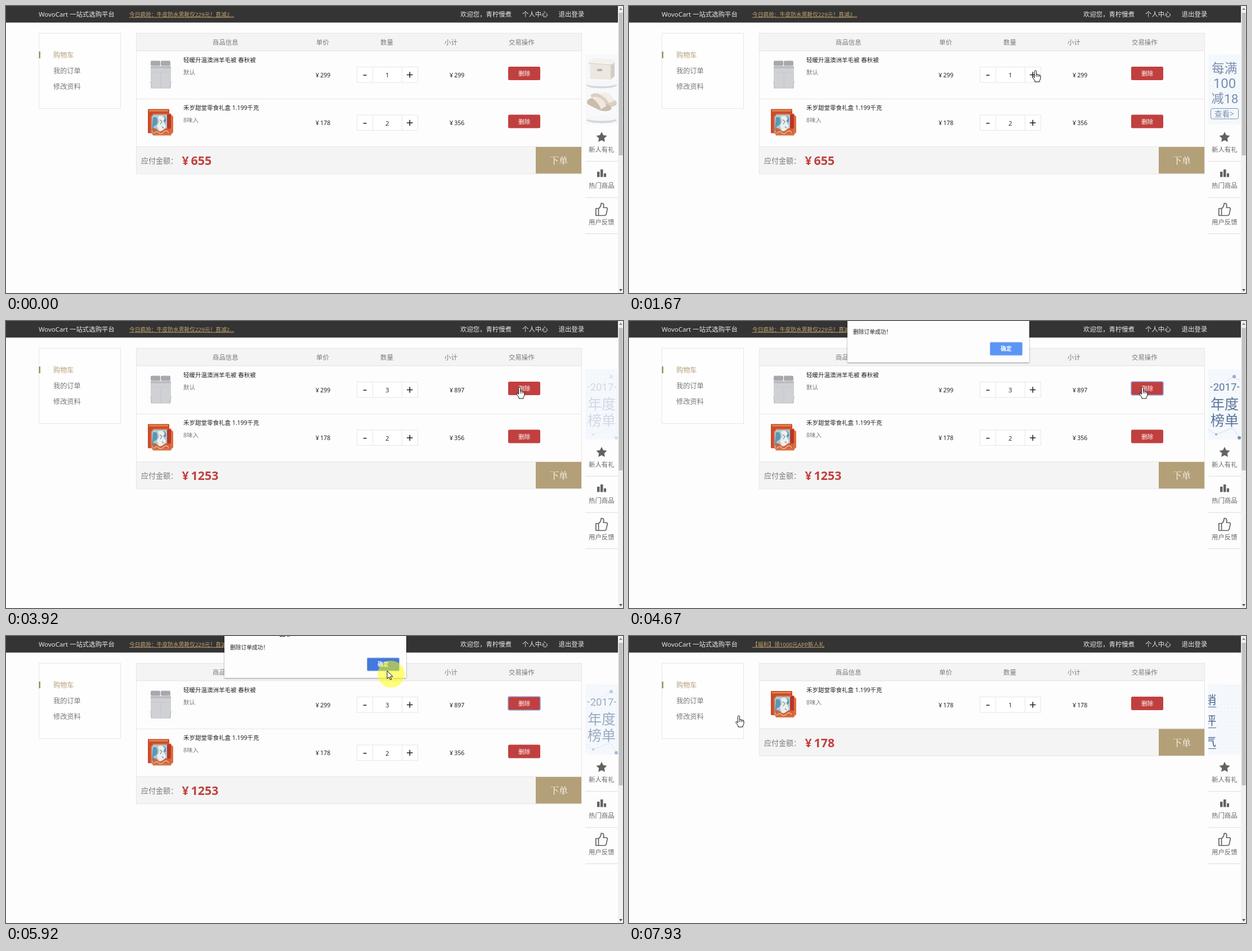
Recreate the animation shown at these times as an HTML page. Size 1096 by 511 pixels, loop 8 s.

```html
<!DOCTYPE html>
<html lang="zh-CN">
<head>
<meta charset="utf-8">
<title>购物车</title>
<style>
  html, body { margin: 0; width: 100%; height: 100%; overflow: hidden; background: #fdfdfd; }
  svg { display: block; width: 1096px; height: 511px; }
  text { font-family: "Noto Sans", "Noto Sans CJK SC", "Noto Sans CJK", sans-serif; white-space: pre; }
  .mid { text-anchor: middle; }
  .bold { font-weight: 700; }
  .link { text-decoration: underline; }
  .serif { font-family: "Noto Serif CJK SC", "Noto Serif", "Noto Sans CJK SC", serif; }
  .num { font-family: Roboto, sans-serif; }
</style>
</head>
<body>
<svg id="stage" viewBox="0 0 1096 511"></svg>
<script>
const LOOP = 8000, ROW = 85.5;
const LINE = '#e6e6e6', GOLD = '#b4a078', RED = '#c0403f', GREY = '#777a76', NAVY = '#46648f';

// Text is placed by the vertical centre of its characters.
const text = (x, mid, size, fill, s, cls = '', id = '') =>
  `<text x="${x}" y="${mid + size * 0.38}" font-size="${size}" fill="${fill}" class="${cls}" id="${id}">${s}</text>`;
const rect = (x, y, w, h, fill, more = '') =>
  `<rect x="${x}" y="${y}" width="${w}" height="${h}" fill="${fill}" ${more}/>`;
const path = (d, fill, more = '') => `<path d="${d}" fill="${fill}" ${more}/>`;
const group = (id, body, more = '') => `<g id="${id}" ${more}>${body}</g>`;
const dot = (x, y, r, fill) => `<circle cx="${x}" cy="${y}" r="${r}" fill="${fill}"/>`;
const disc = (x, y, rx, ry, fill) => `<ellipse cx="${x}" cy="${y}" rx="${rx}" ry="${ry}" fill="${fill}"/>`;
const price = (x, mid, size, fill, n, id, gap, cls = '') =>
  text(x, mid, size, fill, '¥', cls) + text(x + gap, mid, size, fill, n, cls, id);

const bedding =
  rect(257, 107, 36, 40, '#d0d1d4', 'rx="2"') +
  rect(257, 97.5, 17, 9, '#a6a8ac', 'rx="2"') + rect(275, 97.5, 17, 9, '#a6a8ac', 'rx="2"') +
  rect(257, 107, 36, 4, '#bcbdc1') +
  path('M257 118h36M275 118v29', 'none', 'stroke="#c2c3c7" stroke-width=".8"') +
  path('M256.5 134l3 13M293.5 134l-3 13', 'none', 'stroke="#b9babe"');

const giftBox =
  rect(252, 98, 38, 43, '#cd4a2c', 'rx="1"') +
  rect(254, 100, 34, 2, '#e29a50') +
  path('M261 106h32q1 4 4 5v29q-3 1-4 5h-32q-1-4-4-5v-29q3-1 4-5z', '#dc6f3c') +
  path('M262 108h24v16l5 6v12h-29l-3-4v-26z', '#a9cbd6') +
  path('M261 113q7-3 8 5t-5 10 5 11h-8l-2-4zM280 110q7 5 3 12l-5-4z', '#5b97b3') +
  path('M270 111q9-3 12 4l-3 5 5 8-3 9h-9l-4-9 4-7z', '#f0eee9') +
  path('M273 117l4 3-3 5M277 129l3 3', 'none', 'stroke="#6f8fa3" stroke-width="1.2"') +
  path('M260 133q5-3 9 2t9 1 6-4 8 1v9h-30z', '#d1613f') +
  path('M263 141q4-5 8-1t9-1 9 1', 'none', 'stroke="#f0c08a" stroke-width="1.4"') +
  rect(286, 107, 7, 26, '#bb3527', 'rx="2"');

const row = (key, y, picture, title, note, cost) => group('row' + key,
  picture +
  text(315, 96, 10.5, '#222', title) + text(315, 118, 10.5, GREY, note) +
  price(550, 123, 10.5, '#222', cost, '', 8.3) +
  rect(623.5, 108.5, 108, 27.5, '#fff', `stroke="${LINE}"`) +
  path('M651.5 108v28M703.5 108v28', 'none', `stroke="${LINE}"`) +
  path('M634.5 123.3h6M712 122.5h10.5M717.3 117.2v10.6', 'none', 'stroke="#222" stroke-width="1.6"') +
  text(677.3, 123, 11.4, '#333', '', 'mid', 'qty' + key) +
  price(788, 123, 10.5, '#222', '', 'sub' + key, 8.3) +
  rect(892, 108, 57, 24, RED, `rx="2.5" id="del${key}"`) +
  text(920.7, 120.3, 10.5, '#fff', '删除', 'mid'),
  `transform="translate(0 ${y})"`);

const header =
  rect(0, 0, 1087, 29.5, '#333433') +
  text(58, 15, 11.4, '#e8e8e8', 'WovoCart 一站式选购平台') +
  text(219, 15, 9.75, '#c6a472', '', 'link', 'news') +
  text(807, 15, 11.4, '#e8e8e8', '欢迎您，青柠慢煮') +
  text(917, 15, 11.4, '#e8e8e8', '个人中心') +
  text(981.5, 15, 11.4, '#e8e8e8', '退出登录');

const menu =
  rect(58.5, 48.5, 145, 134, '#fefefe', `stroke="${LINE}"`) +
  rect(58.5, 81, 2.5, 12, '#a08c68') +
  ['购物车', '我的订单', '修改资料'].map((s, i) =>
    text(84, 87 + i * 28.3, 12.2, i ? GREY : GOLD, s)).join('');

const table =
  rect(231.5, 48.5, 791, 32, '#f4f4f4') +
  [[367, '商品信息'], [551, '单价'], [665, '数量'], [779, '小计'], [893, '交易操作']]
    .map(([x, s]) => text(x, 64.5, 11.4, GREY, s)).join('') +
  path('M231 79.5H1022', 'none', `stroke="${LINE}"`) +
  row('A', 0, bedding, '轻暖升温澳洲羊毛被 春秋被', '默认', 299) +
  row('B', ROW, giftBox, '禾岁甜堂零食礼盒 1.199千克', '8味入', 178) +
  path('M231 165.5H1022', 'none', `stroke="${LINE}"`) +
  group('foot',
    rect(231.5, 251, 791, 48, '#f4f4f4') +
    path('M231 250.5H1022', 'none', `stroke="${LINE}"`) +
    text(240, 275.5, 13, GREY, '应付金额：') +
    price(312.5, 275, 21.4, RED, '', 'total', 16, 'bold') +
    rect(941, 251, 81, 47.5, GOLD) +
    text(966, 275, 16, '#fff', '下单', 'serif')) +
  `<rect id="frame" x="231.5" y="48.5" width="791" fill="none" stroke="${LINE}"/>`;

const star = Array.from({ length: 10 }, (_, i) => {
  const a = i * Math.PI / 5, r = i % 2 ? 5 : 10;
  return `${1058 + r * Math.sin(a)},${234 - r * Math.cos(a)}`;
}).join(' ');

const dock =
  `<polygon points="${star}" fill="#626262"/>` +
  rect(1050, 295, 4.5, 9.5, '#626262') + rect(1056, 291, 4.5, 13.5, '#626262') + rect(1062, 298, 4, 6.5, '#626262') +
  path('M1047.8 360.5h4.7v12.5h-4.7zM1052.5 361q5-4.5 4.5-9.5 5-1 4.8 4l-.6 3.5h5q2.6 0 2 2.6l-2 9q-.6 2.4-3 2.4h-10.7',
    'none', 'stroke="#626262" stroke-width="1.7" stroke-linejoin="round"') +
  ['新人有礼', '热门商品', '用户反馈'].map((s, i) =>
    text(1035, 255.3 + i * 64.5, 11.4, '#666', s) + rect(1029, 276 + i * 64.5, 58, 1, '#dedede')).join('');

const goods =
  rect(1029, 86, 58, 125, '#f8f9fb') + rect(1029, 86, 58, 125, 'url(#dots)') +
  disc(1058, 141, 27, 5.5, '#d3d7dd') + disc(1058, 138.5, 27, 4.5, '#f5f6f8') +
  path('M1037 102h37v29l-36-1z', '#ece8e1') + path('M1074 102l7-4v27l-7 6z', '#d3cdc4') +
  path('M1035 97l10-4 34 1 3 3v5l-8 4-39-3z', '#f5f2ed') +
  path('M1035 102l39 3 8-4', 'none', 'stroke="#c4bdb2" stroke-width=".8"') +
  rect(1050, 112, 9, 4, '#b9b0a3', 'rx="1"') +
  disc(1058, 203, 27, 5.5, '#d3d7dd') + disc(1058, 200, 27, 4.5, '#f5f6f8') +
  path('M1040 157q9-4 16 1l26 10q6 5 1 9-6 4-14 1l-28-15q-4-3-1-6z', '#d9cfc3') +
  path('M1053 156q9-5 17 0 9 5 10 13l-9 4q-5-10-18-17z', '#f3ede5') +
  path('M1033 168q5-6 13-3l28 13q4 5-2 8-9 3-19-1l-18-9q-5-4-2-8z', '#cabdae') +
  path('M1040 163q8-4 15 1 10 5 11 14l-9 6q-4-12-17-21z', '#f0e8de');

const sale =
  text(1035, 110.5, 22.7, NAVY, '每满') +
  text(1058, 136.5, 24, NAVY, '100', 'mid num') +
  text(1034.5, 164, 22, NAVY, '减') + text(1057, 164, 22.5, NAVY, '18', 'num') +
  rect(1033.5, 182.5, 49, 18.5, 'none', `rx="3" stroke="${NAVY}"`) +
  text(1040, 192, 13.5, NAVY, '查看&gt;');

const rank =
  path('M1058 109l17-10M1075 99l10 7M1043 202l-14-9M1043 202l30-12 11 18', 'none', 'stroke="#c4d0e2" stroke-width=".8"') +
  dot(1075, 99, 3, '#8ba2c4') + dot(1084, 208, 3, '#6584b0') + dot(1043, 202, 2, '#8ba2c4') +
  text(1058.5, 116.5, 18.5, NAVY, '2017', 'mid num') +
  path('M1032.5 117.5h4M1080 117.5h4', 'none', `stroke="${NAVY}" stroke-width="1.3"`) +
  text(1033, 147, 25, NAVY, '年度') + text(1033, 176.5, 25, NAVY, '榜单');

const hot = ['热销', '好评', '人气'].map((s, i) => group('hot' + i,
  text(1037, 113 + i * 37, 21, NAVY, s) + rect(1037, 126 + i * 37, 42, 1, NAVY))).join('');

const banner = group('banner',
  rect(1029, 86, 58, 125, '#f5f8fc') + rect(1029, 86, 58, 125, 'url(#dots)') +
  group('goods', goods) + group('sale', sale) + group('rank', rank) + hot,
  'clip-path="url(#bannerClip)"');

const scrollbar =
  rect(1087, 0, 9, 511, '#f1f1f1') + rect(1088.5, 12, 7, 254, '#c1c1c1') +
  path('M1089 7l3-4 3 4z', '#8a8a8a') + path('M1089 504l3 4 3-4z', '#505050');

const dialog = group('dialog',
  rect(388, -10, 323, 83.5, '#fdfdfd', 'filter="url(#shade)"') +
  text(398, 19.5, 9.75, '#222', '删除订单成功！') +
  rect(641.5, 38, 57, 23, '#5b95f6', 'rx="1.5" stroke="#8fb2ee" id="ok"') +
  text(670, 49.5, 9.75, '#fff', '确定', 'mid bold') +
  group('scrap', rect(486, -1, 10, 1.2, '#444') + rect(499, -1, 5, 1, '#666')));

const cursors =
  `<circle id="halo" r="24" fill="#ff0" opacity=".52"/>` +
  group('arrow', path('M0 0V14L3.3 11 5.6 16 7.8 15 5.5 10.2H10z', '#fff', 'stroke="#111"')) +
  group('hand',
    path('M-1.6 12V1.5a1.6 1.6 0 0 1 3.2 0V7q1.4-1.2 2.8.4 1.6-.9 2.6.7 2-.5 2 1.6V13q0 3-2 5v2h-8v-2L-5 12.5q-.6-2 1-2 1 0 2.4 2z',
      '#fff', 'stroke="#111" stroke-linejoin="round"') +
    path('M1.6 7v4M4.4 7.5V11M7 8.2V11', 'none', 'stroke="#111" stroke-width=".9"'));

document.getElementById('stage').innerHTML =
  `<defs>
    <pattern id="dots" x="1029" y="86" width="6.5" height="6.5" patternUnits="userSpaceOnUse">${dot(3, 3, 0.7, '#e3e9f3')}</pattern>
    <clipPath id="bannerClip">${rect(1029, 86, 58, 125, '#fff')}</clipPath>
    <filter id="shade" x="-5%" y="-20%" width="110%" height="150%"><feDropShadow dx="0" dy="1" stdDeviation="1" flood-opacity=".5"/></filter>
  </defs>` + header + menu + table + dock + banner + scrollbar + dialog + cursors;

// Each step: start time, pointer kind (a = arrow, h = hand), pointer tip.
const steps = [
  [0], [250, 'a', 819, 321], [670, 'a', 800, 300], [920, 'a', 745, 235], [1170, 'a', 685, 160],
  [1420, 'h', 716, 118], [1670, 'h', 722, 115], [1930, 'h', 722, 116], [2180, 'h', 721, 118],
  [2680, 'h', 720, 120], [2930, 'h', 720, 120], [3180, 'a', 800, 106], [3430, 'a', 860, 99],
  [3680, 'h', 912, 116], [3920, 'h', 912, 118], [4170, 'h', 912, 118], [4420, 'h', 912, 118],
  [4670, 'h', 912, 118], [4930, 'h', 912, 118], [5180, 'a', 840, 100], [5430, 'a', 720, 68],
  [5680, 'a', 677, 62], [5930, 'a', 666, 84], [6180, 'a', 650, 108], [6430, 'h', 641, 120],
  [6670, 'h', 641, 122], [6930, 'h', 641, 122], [7180, 'h', 641, 122], [7430, 'a', 610, 130],
  [7680, 'a', 420, 140], [7930, 'h', 195, 142]
];

const $ = id => document.getElementById(id);
const ramp = (t, a, b) => Math.min(1, Math.max(0, (t - a) / (b - a)));
const show = (id, on) => { $(id).style.display = on ? '' : 'none'; };
const move = (id, x, y) => $(id).setAttribute('transform', `translate(${x} ${y})`);
const attr = (id, name, v) => $(id).setAttribute(name, v);

function drawCart(t) {
  const removed = t >= 5930;
  const a = t < 1930 ? 1 : t < 2680 ? 2 : 3;
  const b = t < 6930 ? 2 : 1;
  $('qtyA').textContent = a;
  $('subA').textContent = a * 299;
  $('qtyB').textContent = b;
  $('subB').textContent = b * 178;
  $('total').textContent = (removed ? 0 : a * 299) + b * 178;
  show('rowA', !removed);
  move('rowB', 0, removed ? 0 : ROW);
  move('foot', 0, removed ? -ROW : 0);
  attr('frame', 'height', removed ? 165 : 250.5);
  attr('delA', 'stroke', t >= 4170 ? '#8ea4e8' : 'none');
  attr('delA', 'stroke-width', 1.5);
}

function drawDialog(t) {
  show('dialog', t >= 4670 && t < 5930);
  show('scrap', t >= 4930);
  move('dialog', 0, t < 4930 ? 0 : 1);
  attr('ok', 'fill', t >= 5680 ? '#4379db' : '#5b95f6');
}

function drawBanner(t) {
  $('goods').style.opacity = 1 - ramp(t, 0, 1100);
  $('sale').style.opacity = ramp(t, 1000, 1950) * (1 - ramp(t, 2930, 3900));
  $('rank').style.opacity = ramp(t, 3700, 4800) * (1 - ramp(t, 5150, 6250));
  for (let i = 0; i < 3; i++) {
    const start = 6150 + 250 * i;
    move('hot' + i, 50 * (1 - ramp(t, start, start + 260)) - 46 * ramp(t, 7680, 8000), 0);
  }
}

function drawNews(t) {
  const fresh = t >= 6180;
  $('news').textContent = fresh ? '【福利】领1000元APP新人礼' : '今日疯抢：牛皮防水男靴仅229元！直减2...';
  move('news', 0, fresh ? 3 * (1 - ramp(t, 6180, 6920)) : 0);
}

function drawPointer(kind, x, y) {
  show('arrow', kind === 'a');
  show('halo', kind === 'a');
  show('hand', kind === 'h');
  if (!kind) return;
  move(kind === 'a' ? 'arrow' : 'hand', x, y);
  attr('halo', 'cx', x + 7);
  attr('halo', 'cy', y + 6);
}

const origin = performance.now();
function tick() {
  const now = (performance.now() - origin) % LOOP;
  const [t, kind, x, y] = steps.findLast(s => s[0] <= now);
  drawCart(t);
  drawDialog(t);
  drawBanner(t);
  drawNews(t);
  drawPointer(kind, x, y);
  requestAnimationFrame(tick);
}
tick();
</script>
</body>
</html>
```
